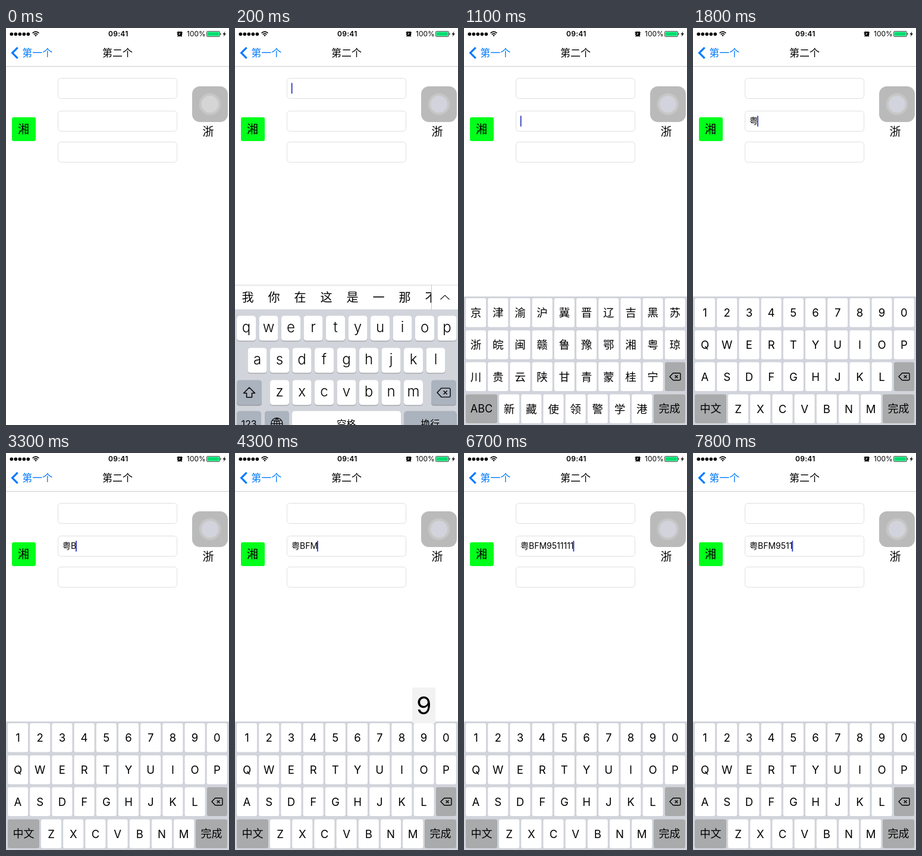
Recreate the animation shown at these times as an HTML page. Size 375 by 667 pixels, loop 8000 ms.

```html
<!DOCTYPE html>
<html lang="zh">
<head>
<meta charset="utf-8">
<style>
html, body { margin: 0; width: 100%; height: 100%; overflow: hidden; background: #fff; }
svg { display: block; width: 375px; height: 667px; }
text { font-family: Inter, "Noto Sans CJK SC", "Noto Sans CJK", sans-serif; white-space: pre; }
.mid { text-anchor: middle; }
</style>
</head>
<body>
<svg id="stage" viewBox="0 0 375 667" xmlns="http://www.w3.org/2000/svg">
  <rect width="375" height="667" fill="#fff"/>
  <g id="status">
    <path d="M44.6 8.6Q50 3.8 55.4 8.6M46.7 10.9Q50 8 53.3 10.9" fill="none" stroke="#000" stroke-width="1.6"/>
    <path d="M48.2 12.3Q50 10.8 51.8 12.3L50 14.2Z"/>
    <text x="188.8" y="14.4" class="mid" font-size="12" font-weight="600" letter-spacing=".3">09:41</text>
    <circle cx="292.2" cy="10.2" r="4.1"/>
    <path d="M292.2 7.8V10.4H290.4" fill="none" stroke="#fff"/>
    <path d="M287.6 8.2L290 5.8M294.4 5.8L296.8 8.2M289.6 13.3L288.6 14.6M294.8 13.3L295.8 14.6" stroke="#000" stroke-width="1.2"/>
    <text x="304" y="14.4" font-size="12">100%</text>
    <rect x="337.5" y="5.5" width="22" height="9" rx="1.5" fill="none" stroke="#555"/>
    <rect x="338.5" y="6.5" width="20" height="7" fill="#04de71"/>
    <path d="M360.3 8.4Q361.8 8.8 361.8 10T360.3 11.6Z" fill="#333"/>
    <path d="M368.6 5.4L364.4 10.8H367L365.6 14.8L370 9.2H367.2Z"/>
  </g>
  <path d="M19.6 32.8L10.6 41.8L19.6 50.8" fill="none" stroke="#007aff" stroke-width="3.2"/>
  <text x="27.3" y="48" font-size="17" fill="#007aff">第一个</text>
  <text x="187.5" y="48" class="mid" font-size="17" font-weight="500">第二个</text>
  <rect y="64" width="375" height="1" fill="#cbcbcd"/>
  <g id="fields" fill="#fff" stroke="#dfdfdf"></g>
  <rect x="10" y="150" width="40" height="40" rx="3" fill="#00ff1a"/>
  <text x="29.6" y="176.8" class="mid" font-size="19">湘</text>
  <text x="340" y="181.4" class="mid" font-size="19">浙</text>
  <rect x="313" y="98" width="60" height="60" rx="13" fill="#bababa"/>
  <circle cx="343" cy="128" r="18.5" fill="#c6c6c6"/>
  <circle id="knob" cx="343" cy="128" r="14.3" stroke="#cfcfcf"/>
  <text id="plate" x="95" y="161.3" font-size="14"></text>
  <rect id="caret" width="2" height="18" fill="#3d47c4"/>
  <g id="pinyin"></g>
  <g id="areas"></g>
  <g id="letters"></g>
  <g id="pop">
    <rect x="-19.5" y="-60" width="39" height="60" rx="3" fill="#f2f2f2"/>
    <text id="popText" y="-15.3" class="mid" font-size="41"></text>
  </g>
</svg>
<script>
const LOOP = 8000, KB_IN = 50, FOCUS = 100, SWITCH = 800;
const $ = id => document.getElementById(id);

function add(parent, tag, attrs, text) {
  const el = document.createElementNS("http://www.w3.org/2000/svg", tag);
  for (const k in attrs) el.setAttribute(k, attrs[k]);
  if (text) el.textContent = text;
  parent.append(el);
  return el;
}
const label = (g, x, y, size, text) =>
  add(g, "text", { x, y, class: "mid", "font-size": size }, text);
const line = (g, d, width = 1.4) =>
  add(g, "path", { d, fill: "none", stroke: "#000", "stroke-width": width, "stroke-linejoin": "round" });

for (let i = 0; i < 5; i++) add($("status"), "circle", { cx: 9.3 + 7 * i, cy: 10.2, r: 2.8 });
for (const y of [84.5, 139.5, 191.5])
  add($("fields"), "rect", { x: 87.5, y, width: 200, height: 34, rx: 5 });

// Backspace symbol centred on (x, y), w wide and h high
function backspace(g, x, y, w, h) {
  const l = x - w / 2, r = x + w / 2, t = y - h / 2, b = y + h / 2, n = l + w * .32, c = x + w * .12, s = h * .2;
  line(g, `M${l} ${y}L${n} ${t}H${r - 2}Q${r} ${t} ${r} ${t + 2}V${b - 2}Q${r} ${b} ${r - 2} ${b}H${n}Z`);
  line(g, `M${c - s} ${y - s}l${2 * s} ${2 * s}m0 ${-2 * s}l${-2 * s} ${2 * s}`);
}

// System keyboard, laid out at its resting place
function buildPinyin(g) {
  const key = (x, y, w, fill = "#fff") => {
    add(g, "rect", { x, y: y + 1, width: w, height: 42, rx: 4.5, fill: "#898c92" });
    add(g, "rect", { x, y, width: w, height: 42, rx: 4.5, fill });
  };
  const dark = "#abb3be";
  add(g, "rect", { y: 409, width: 375, height: 42, fill: "#fff" });
  add(g, "rect", { y: 450, width: 375, height: 260, fill: "#d1d4db" });
  add(g, "rect", { y: 409, width: 375, height: 1, fill: "#d0d1d4" });
  [..."我你在这是一那不"].forEach((c, i) => label(g, 21.5 + 44 * i, 437, 20, c));
  add(g, "rect", { x: 330, y: 410, width: 45, height: 40, fill: "#fff" });
  add(g, "rect", { x: 330, y: 409, width: 1, height: 42, fill: "#c4c6ca" });
  line(g, "M345.5 433.5L353 426.5L360.5 433.5", 1.2);
  [["qwertyuiop", 3, 461], ["asdfghjkl", 21.5, 515], ["zxcvbnm", 59, 569]].forEach(([row, x, y]) =>
    [...row].forEach((c, i) => {
      key(x + 37.5 * i, y, 32);
      label(g, x + 37.5 * i + 16, y + 27.5, 24, c).setAttribute("font-weight", 300);
    }));
  key(3, 569, 42, dark);
  line(g, "M24 581.5L14.5 591H19.5V598H28.5V591H33.5Z", 1.5);
  key(330, 569, 42, dark);
  backspace(g, 351, 590, 22, 15);
  key(3, 621, 41, dark);
  label(g, 23.5, 648, 16, "123");
  key(50, 621, 41, dark);
  add(g, "circle", { cx: 70.3, cy: 642, r: 9.5, fill: "none", stroke: "#000", "stroke-width": 1.2 });
  line(g, "M70.3 632.5V651.5M60.8 642H79.8M62.8 636.5Q70.3 640 77.8 636.5M62.8 647.5Q70.3 644 77.8 647.5M70.3 632.5Q61.5 642 70.3 651.5Q79.1 642 70.3 632.5", 1.1);
  key(96, 621, 183);
  label(g, 187.3, 648, 16, "空格");
  key(284.5, 621, 88, dark);
  label(g, 328.3, 648, 16, "换行");
}

const STEP = 37.2, ROW_Y = [454, 508, 561.5, 615.5];
const LETTERS = ["1234567890", "QWERTYUIOP", "ASDFGHJKL", "ZXCVBNM"];
const AREAS = ["京津渝沪冀晋辽吉黑苏", "浙皖闽赣鲁豫鄂湘粤琼", "川贵云陕甘青蒙桂宁", "新藏使领警学港"];
const spots = {};

function buildPlate(g, rows, toggle) {
  const key = (x, y, w, fill = "#fff") =>
    add(g, "rect", { x, y, width: w, height: 48.5, rx: 3, fill });
  add(g, "rect", { y: 451, width: 375, height: 216, fill: "#d1d4db" });
  rows.forEach((row, r) => [...row].forEach((c, i) => {
    const x = (r == 3 ? 59 : 3) + STEP * i, y = ROW_Y[r];
    key(x, y, 34);
    label(g, x + 17, y + 31, 18.5, c);
    spots[c] = [x + 17, y];
  }));
  key(338, ROW_Y[2], 34, "#a9aaab");
  backspace(g, 355, 585.8, 18, 12);
  key(3, ROW_Y[3], 53, "#a9aaab");
  key(319, ROW_Y[3], 53, "#a9aaab");
  label(g, 29.5, 646, 18, toggle);
  label(g, 345.5, 646, 18, "完成");
}

buildPinyin($("pinyin"));
buildPlate($("areas"), AREAS, "ABC");
buildPlate($("letters"), LETTERS, "中文");

// [key, touch down, touch up]; "<" deletes
const TAPS = [
  ["粤", 1600, 1700], ["B", 3100, 3300], ["F", 3500, 3700], ["M", 3800, 4000],
  ["9", 4300, 4400], ["5", 4900, 5100],
  ["1", 5500, 5600], ["1", 5700, 5800], ["1", 5900, 6000], ["1", 6200, 6300], ["1", 6400, 6500],
  ["<", 7000, 7100], ["<", 7200, 7300], ["<", 7500, 7600]
];

const show = (id, on) => $(id).setAttribute("display", on ? "inline" : "none");
const clamp = v => Math.max(0, Math.min(1, v));

function blink(age) {
  const p = age % 1000;
  return p < 800 ? clamp((560 - p) / 160) : clamp((p - 800) / 160);
}

function draw(t) {
  let text = "", since = t < SWITCH ? FOCUS : SWITCH, held = null;
  for (const [c, down, up] of TAPS) {
    if (t >= up) {
      text = c == "<" ? text.slice(0, -1) : text + c;
      since = up;
    } else if (t >= down && c != "<") held = c;
  }

  const rest = Math.exp(-Math.max(0, t - KB_IN) / 62);
  show("pinyin", t >= KB_IN && t < SWITCH);
  $("pinyin").setAttribute("transform", `translate(0 ${t < 550 ? 258 * rest : 0})`);
  show("areas", t >= SWITCH && !text);
  show("letters", text);
  $("knob").setAttribute("fill", t < FOCUS ? "#d5d5d5" : "#d2d3dc");

  const plate = $("plate");
  plate.textContent = text;
  const caret = $("caret");
  caret.setAttribute("x", 94.6 + (text ? plate.getComputedTextLength() - .8 : 0));
  caret.setAttribute("y", t < SWITCH ? 92.3 : 147.5);
  caret.setAttribute("opacity", t < FOCUS ? 0 : blink(t - since));

  show("pop", held);
  if (held) {
    const [x, y] = spots[held];
    $("pop").setAttribute("transform", `translate(${x} ${y})`);
    $("popText").textContent = held;
  }
}

const start = performance.now();
function tick() {
  draw((performance.now() - start) % LOOP);
  requestAnimationFrame(tick);
}
tick();
</script>
</body>
</html>
```
